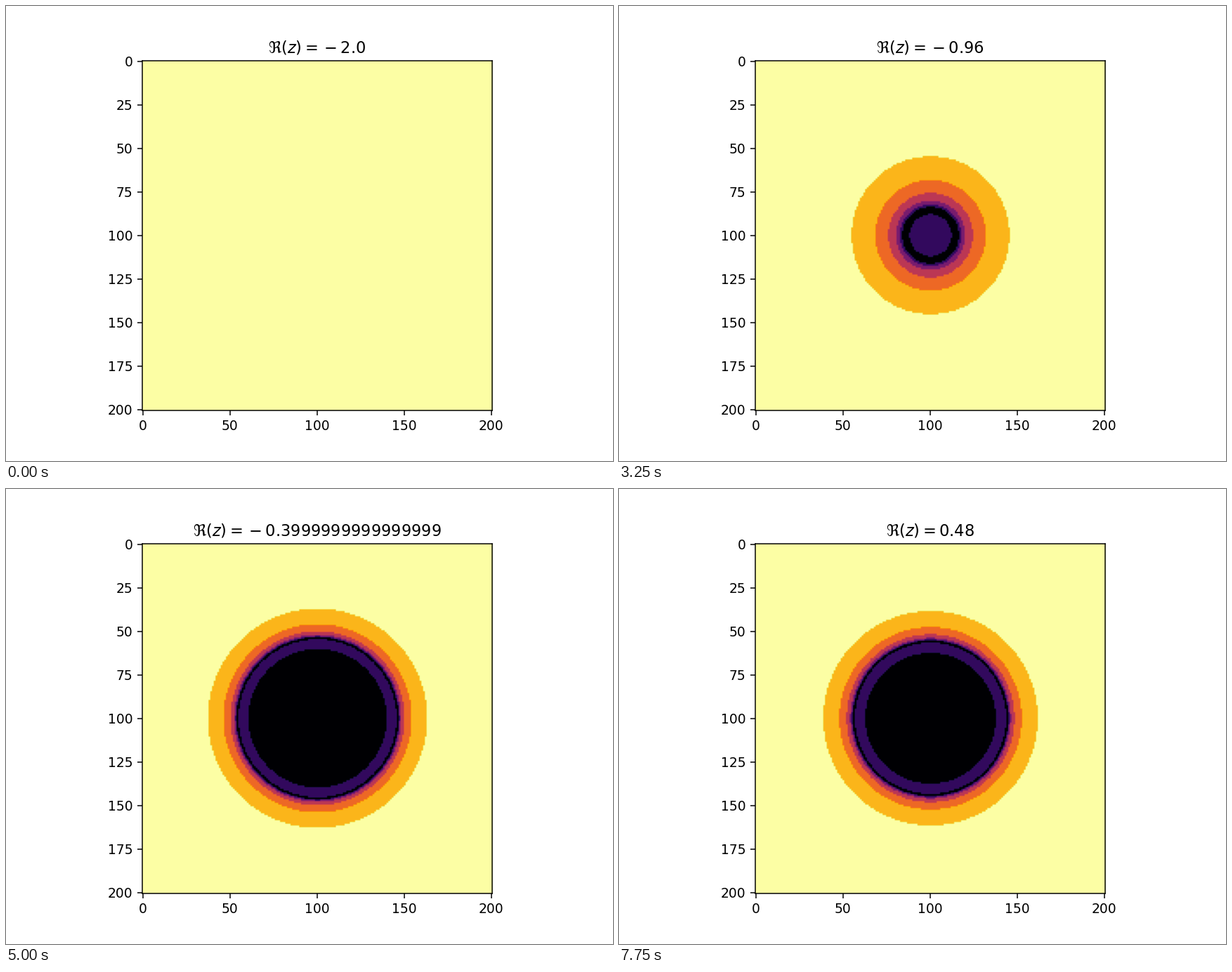
These frames come from a looping animation (864 px wide and 648 px high, 8000 ms). A matplotlib script:

```python
import numpy as np
import matplotlib.pyplot as plt
from matplotlib.animation import FuncAnimation

FRAMES = 32
INTERVAL = 250

axis = np.linspace(-2, 2, 201)
slices = np.linspace(-2, 2, 51)
imag2 = axis[:, None] ** 2 + axis[None, :] ** 2

OUTER = 1.319
OFFSET = 0.005
SHELL_COUNT = 6
INNER_BAND = (0.79, 0.98)


def shell_radii():
    """Nested radii, each mapped onto the one before by r -> r^2 - OFFSET."""
    radii = [OUTER]
    while len(radii) < SHELL_COUNT:
        radii.append(np.sqrt(radii[-1] + OFFSET))
    return radii


SHELLS = shell_radii()


def levels(re):
    """Escape level over one slice of constant real part."""
    r2 = re ** 2 + imag2
    out = sum((r2 > r ** 2).astype(float) for r in SHELLS)
    out[(r2 > INNER_BAND[0]) & (r2 < INNER_BAND[1])] = 1
    return out


def title(re):
    # The empty group keeps the minus spaced as a binary operator.
    gap = "{}" if re < 0 else ""
    return rf"$\Re(z)={gap}{float(re)}$"


fig, ax = plt.subplots(figsize=(6.4, 4.8), dpi=135)
fig.subplots_adjust(bottom=1 / 9)
image = ax.imshow(levels(slices[0]), cmap="inferno", vmin=0, vmax=SHELL_COUNT)
label = ax.set_title(title(slices[0]))


def update(i):
    re = slices[i]
    image.set_data(levels(re))
    label.set_text(title(re))
    return image, label


anim = FuncAnimation(fig, update, frames=FRAMES, interval=INTERVAL,
                     repeat=True, repeat_delay=0, blit=False)
plt.show()
```
